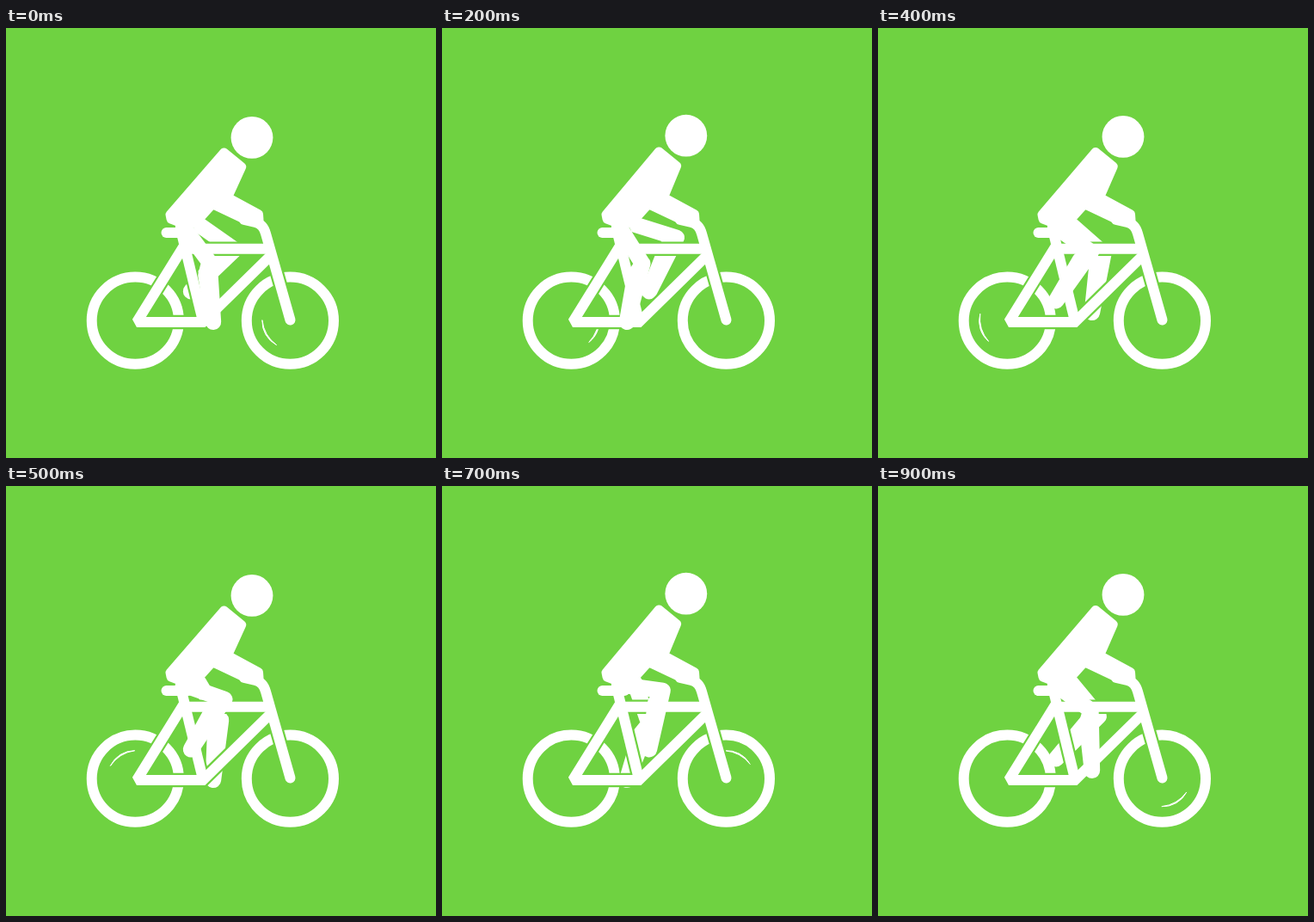
Animation, 500 px wide and 500 px high, one loop 1000 ms. Source, as an HTML page:

```html
<!DOCTYPE html>
<html lang="en">
<head>
<meta charset="utf-8">
<title>Cyclist</title>
<style>
  html, body { margin: 0; width: 100%; height: 100%; overflow: hidden; background: #6fd241; }
  svg { display: block; width: 100vw; height: 100vh; }
  .line { fill: none; stroke: #fff; stroke-width: 12; stroke-miterlimit: 1.5; }
  .gap { stroke: #6fd241; stroke-width: 16.5; }
  .leg { fill: #fff; stroke: #fff; stroke-width: 18.5; stroke-linecap: round; stroke-linejoin: round; }
  .body { fill: #fff; stroke: #fff; stroke-width: 11; stroke-linejoin: round; }
  .solid { fill: #fff; }
  .shine { fill: #fff; stroke: #fff; stroke-width: 1; stroke-linejoin: round; }
</style>
</head>
<body>
<svg viewBox="0 0 500 500">
  <defs>
    <g id="frame">
      <path d="M307 265.5L229 342H152L209 250"/>
      <path d="M204 238L229 341"/>
      <path d="M209 256.8H307"/>
      <path d="M186.5 238H212" stroke-linecap="round"/>
      <path d="M277 223L290 226Q299 228 302 239L330.5 339.5" stroke-linecap="round"/>
    </g>
  </defs>
  <circle class="line" cx="150.3" cy="340.2" r="50.6"/>
  <circle class="line" cx="330.4" cy="340.2" r="50.6"/>
  <path id="gleam" class="shine"/>
  <path id="far" class="leg"/>
  <use href="#frame" class="line gap"/>
  <use href="#frame" class="line"/>
  <path id="near" class="leg"/>
  <path id="torso" class="body"/>
  <circle id="head" class="solid" r="24.4"/>
</svg>
<script>
const STEP = 100, STEPS = 10;
const THIGH = 51, CALF = 70;
const CRANK = { x: 228, y: 324, r: 22 };
const LEFT = 150.3, RIGHT = 330.4;

// wheel centre and middle angle of the shine, per step
const SHINE = [
  [RIGHT, 150], [RIGHT, 210], [LEFT, 20], [LEFT, 90], [LEFT, 163],
  [LEFT, 238], [LEFT, 315], [RIGHT, 298], [RIGHT, 0], [RIGHT, 60]
];
// how far the rider leans back, repeating every half turn
const BOB = [0, 1.5, 2.2, 2, 1];

const rad = deg => deg * Math.PI / 180;
const set = (id, attrs) => {
  const el = document.getElementById(id);
  for (const key in attrs) el.setAttribute(key, attrs[key]);
};
const fix = (...nums) => nums.map(n => n.toFixed(2)).join(' ');

// two-bone leg from hip to pedal, knee bent forwards, fuller at the calf
function legPath(hipX, hipY, deg) {
  const footX = CRANK.x + CRANK.r * Math.cos(rad(deg));
  const footY = CRANK.y + CRANK.r * Math.sin(rad(deg));
  const dx = footX - hipX, dy = footY - hipY, dist = Math.hypot(dx, dy);
  const along = (THIGH ** 2 + dist ** 2 - CALF ** 2) / (2 * dist);
  const out = Math.sqrt(Math.max(0, THIGH ** 2 - along ** 2));
  const kneeX = hipX + (dx * along + dy * out) / dist;
  const kneeY = hipY + (dy * along - dx * out) / dist;
  const cx = footX - kneeX, cy = footY - kneeY;
  const calf = fix(kneeX + 0.22 * cx - 0.07 * cy, kneeY + 0.22 * cy + 0.07 * cx);
  const knee = fix(kneeX, kneeY);
  return `M${fix(hipX, hipY)}L${knee}M${knee}L${fix(footX, footY)}L${calf}Z`;
}

// thin crescent, narrow at both ends
function gleamPath(cx, mid) {
  const r = 32.5, cy = 340.2;
  const at = deg => fix(cx + r * Math.cos(rad(deg)), cy + r * Math.sin(rad(deg)));
  const a = at(mid - 31), b = at(mid + 31);
  return `M${a}A31 31 0 0 1 ${b}A42 42 0 0 0 ${a}Z`;
}

function draw(step) {
  const bob = BOB[step % BOB.length], lean = bob * 0.5;
  const deg = 54 + 36 * step;
  set('gleam', { d: gleamPath(...SHINE[step]) });
  set('far', { d: legPath(224, 228.5, deg + 180) });
  set('near', { d: legPath(206, 231, deg) });
  set('torso', {
    d: `M${fix(253.5 - lean, 145 - lean)}L${fix(273.7 - lean, 161.5 - lean)}` +
       'L257.5 197L293.5 216.5L294 223.5L278 222.5L240 204.5L226 220L208 228L192 222L191 217Z'
  });
  set('head', { cx: 286 - bob, cy: 127.4 - bob });
}

let shown = -1;
function tick() {
  const step = Math.floor(performance.now() / STEP) % STEPS;
  if (step !== shown) draw(shown = step);
  requestAnimationFrame(tick);
}
tick();
</script>
</body>
</html>
```
